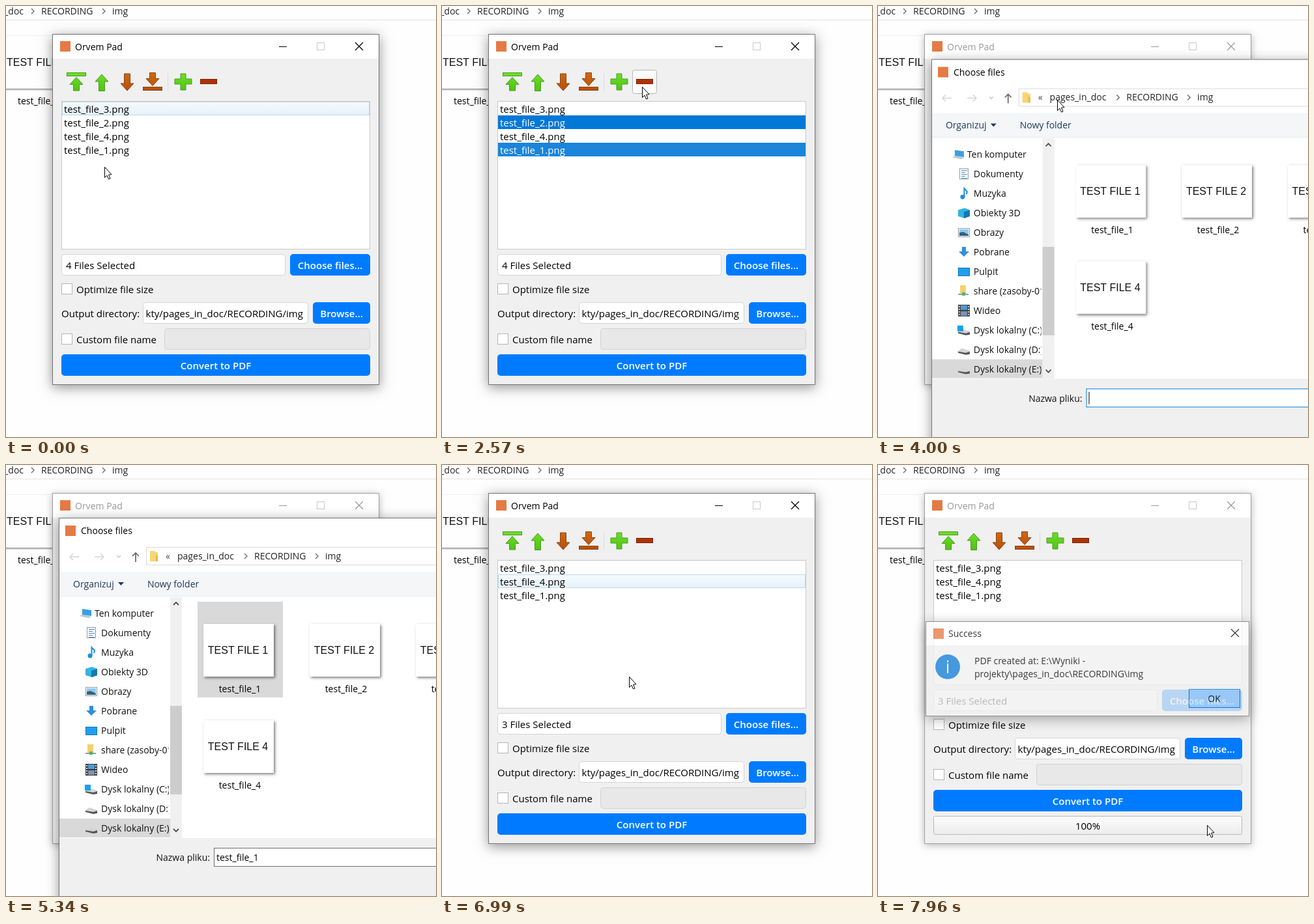
Recreate the animation shown at these times as an HTML page with a canvas. Size 660 px wide and 662 px high, loop 8 s.

```html
<!DOCTYPE html>
<html lang="en">
<head>
<meta charset="utf-8">
<title>Orvem Pad</title>
<style>
html, body { margin: 0; width: 100%; height: 100%; overflow: hidden; background: #fefefe; }
canvas { display: block; }
</style>
</head>
<body>
<canvas id="stage" width="660" height="662"></canvas>
<script>
const W = 660, H = 662, LOOP = 8000, STEP = 60;
const UI = '"Open Sans", "Noto Sans", sans-serif';
const F14 = '14px ' + UI, F15 = '15px ' + UI, BOLD = '600 15px ' + UI;
const ARIAL = '16px "Liberation Sans", Arial, sans-serif';
const BLUE = '#007bff', DARK_BLUE = '#0069d9', ACCENT = '#0078d7', BADGE = '#e57a45';

const screen = document.getElementById('stage').getContext('2d');
const buffer = document.createElement('canvas');
buffer.width = W;
buffer.height = H;
let g = screen;

// Pointer path: start time, number of steps, end point
const START = [151, 247];
const MOVES = [
  [420, 7, 141, 166], [970, 2, 147, 181], [1520, 2, 166, 204], [1770, 2, 172, 220],
  [2270, 6, 307, 124], [3130, 5, 489, 395], [3820, 4, 275, 144], [4060, 7, 360, 284],
  [4660, 4, 700, 560], [5890, 1, 489, 395], [5950, 7, 224, 258], [6810, 13, 505, 553]
];
const CLICKS = [1210, 2020, 2820, 3500, 4540, 7720];

const ease = p => p * p * (3 - 2 * p);
const stepsSince = (t, start) => Math.floor((t - start) / STEP) + 1;
const between = (t, a, b) => t >= a && t < b;

function pointer(t) {
  let [x, y] = START;
  for (const [start, n, tx, ty] of MOVES) {
    if (t < start) break;
    const p = ease(Math.min(1, stepsSince(t, start) / n));
    x += (tx - x) * p;
    y += (ty - y) * p;
  }
  return { x: Math.round(x), y: Math.round(y) };
}

function rect(x, y, w, h, fill, stroke) {
  if (fill) { g.fillStyle = fill; g.fillRect(x, y, w, h); }
  if (stroke) { g.strokeStyle = stroke; g.lineWidth = 1; g.strokeRect(x + .5, y + .5, w - 1, h - 1); }
}

function round(x, y, w, h, r, fill, stroke) {
  g.beginPath();
  g.roundRect(x + (stroke ? .5 : 0), y + (stroke ? .5 : 0), w - (stroke ? 1 : 0), h - (stroke ? 1 : 0), r);
  g.fillStyle = fill;
  g.fill();
  if (stroke) { g.strokeStyle = stroke; g.lineWidth = 1; g.stroke(); }
}

function text(s, x, y, font = F15, color = '#000', align = 'left') {
  g.font = font;
  g.fillStyle = color;
  g.textAlign = align;
  g.fillText(s, x, y);
}

function line(points, color, width = 1) {
  g.beginPath();
  for (let i = 0; i < points.length; i += 2) g.lineTo(points[i], points[i + 1]);
  g.strokeStyle = color;
  g.lineWidth = width;
  g.stroke();
}

function poly(points, fill, stroke, width = 1) {
  g.beginPath();
  for (let i = 0; i < points.length; i += 2) g.lineTo(points[i], points[i + 1]);
  g.closePath();
  if (fill) { g.fillStyle = fill; g.fill(); }
  if (stroke) { g.strokeStyle = stroke; g.lineWidth = width; g.stroke(); }
}

function disc(x, y, r, fill) {
  g.beginPath();
  g.arc(x, y, r, 0, 7);
  g.fillStyle = fill;
  g.fill();
}

function clipped(x, y, w, h, draw) {
  g.save();
  g.beginPath();
  g.rect(x, y, w, h);
  g.clip();
  draw();
  g.restore();
}

function vertical(y0, y1, a, b) {
  const fill = g.createLinearGradient(0, y0, 0, y1);
  fill.addColorStop(0, a);
  fill.addColorStop(1, b);
  return fill;
}

// Draws a window on its own layer so that it fades as one piece
function layer(alpha, scale, cx, cy, draw) {
  g = buffer.getContext('2d');
  g.setTransform(1, 0, 0, 1, 0, 0);
  g.clearRect(0, 0, W, H);
  g.setTransform(scale, 0, 0, scale, cx * (1 - scale), cy * (1 - scale));
  draw();
  g = screen;
  g.globalAlpha = alpha;
  g.drawImage(buffer, 0, 0);
  g.globalAlpha = 1;
}

function frame(x, y, w, h, fill, active) {
  g.save();
  g.shadowColor = active ? 'rgba(0,0,0,.42)' : 'rgba(0,0,0,.28)';
  g.shadowBlur = active ? 18 : 11;
  g.shadowOffsetY = active ? 4 : 2;
  rect(x, y, w, h, fill);
  g.restore();
  rect(x, y, w, h, null, active ? '#737373' : '#a0a0a0');
}

function cross(x, y, color) {
  line([x - 6, y - 6, x + 6, y + 6], color, 1.2);
  line([x + 6, y - 6, x - 6, y + 6], color, 1.2);
}

const chevron = (x, y, color = '#666') => line([x - 2, y - 4, x + 2, y, x - 2, y + 4], color, 1.3);

function thumb(x, y, n) {
  g.save();
  g.shadowColor = 'rgba(0,0,0,.5)';
  g.shadowBlur = 4;
  g.shadowOffsetX = g.shadowOffsetY = 2;
  rect(x, y, 108, 81, '#fff');
  g.restore();
  text('TEST FILE ' + n, x + 53, y + 46, ARIAL, '#111', 'center');
  text('test_file_' + n, x + 56, y + 105, F14, '#000', 'center');
}

function desktop() {
  rect(0, 0, W, H, '#fefefe');
  text('_doc', 27, 13, F14, '#222', 'right');
  chevron(41, 8);
  text('RECORDING', 54, 13, F14, '#222');
  chevron(150, 8);
  text('img', 163, 13, F14, '#222');
  rect(0, 21, W, 1, '#e3e3e3');
  rect(0, 45, 72, 1, '#f0f0f0');
  rect(0, 127, 76, 1, '#8c8c8c');
  rect(0, 128, 76, 2, '#d4d4d4');
  text('TEST FILE 1', 1, 92, ARIAL, '#111');
  text('test_file_1', 18, 151, F14);
}

function arrow(x, top, bottom, up, fill, edge) {
  const tip = up ? top : bottom, tail = up ? bottom : top, neck = tip + (up ? 11 : -11);
  poly([x, tip, x + 10, neck, x + 4.5, neck, x + 4.5, tail, x - 4.5, tail, x - 4.5, neck, x - 10, neck], fill, edge);
}

function toolbar(hover) {
  const green = vertical(102, 130, '#6fe02a', '#4fc414'), greenEdge = '#4a9a1e';
  const brown = vertical(102, 130, '#cf6a12', '#b84e0c'), brownEdge = '#8a4310';
  rect(93, 102, 30, 6, green, greenEdge);
  arrow(108, 109.5, 130, true, green, greenEdge);
  arrow(147, 105, 130.5, true, green, greenEdge);
  arrow(186, 104, 130, false, brown, brownEdge);
  arrow(225, 102.5, 122.5, false, brown, brownEdge);
  rect(210, 124, 30, 6, brown, brownEdge);
  rect(248, 103, 1, 28, '#dcdcdc');
  poly([268, 104, 276, 104, 276, 112, 285, 112, 285, 120, 276, 120, 276, 129, 268, 129, 268, 120, 259, 120, 259, 112, 268, 112],
    green, greenEdge);
  if (hover) round(292, 98, 38, 37, 3, '#fdfdfd', '#b4b4b4');
  rect(298, 112, 26, 8, '#ae3208', '#7c2405');
}

function fileList(t, height) {
  rect(85, 146, 474, height, '#fff', '#c9c9c9');
  const names = t < 2880 ? [3, 2, 4, 1] : t < 5580 ? [3, 4] : [3, 4, 1];
  const focus = t < 1210 ? 0 : between(t, 2880, 7720) ? 1 : -1;
  names.forEach((n, i) => {
    const y = 147 + 21 * i;
    const second = i === 1 && between(t, 1210, 2880);
    const fourth = i === 3 && between(t, 2020, 2880);
    if (second) rect(86, y + 21 - 21, 472, 21, ACCENT);
    if (fourth) rect(86, y, 472, 21, '#1a85db');
    if (i === focus) rect(86, y, 472, 21, vertical(y, y + 21, '#f5fafe', '#e6f1fa'), '#bfd9ea');
    text('test_file_' + n + '.png', 89, y + 17, F15, second || fourth ? '#fff' : '#000');
  });
}

function button(x, y, w, label, dark) {
  round(x, y, w, 33, 5, dark ? DARK_BLUE : BLUE);
  text(label, x + w / 2, y + 23, BOLD, '#fff', 'center');
}

function checkbox(y, label) {
  rect(85, y, 17, 17, '#fff', '#b5b5b5');
  text(label, 108, y + 15);
}

function appWindow(t, hover) {
  const active = !between(t, 3620, 5520) && t < 7840;
  const ink = active ? '#000' : '#999';
  const shift = t >= 7840 ? -36 : 0;
  frame(71, 43, 502, 539, '#f0f0f0', active);
  rect(72, 44, 500, 37, '#fff');
  rect(83, 54, 16, 16, BADGE);
  text('Orvem Pad', 106, 68, F14, ink);
  rect(419, 62, 12, 1, ink);
  rect(477, 56, 12, 12, null, '#c8c8c8');
  cross(542, 62, ink);
  toolbar(hover === 'remove');
  fileList(t, 228 + shift);

  g.save();
  g.translate(0, shift);
  const count = t < 2880 ? 4 : t < 5580 ? 2 : 3;
  round(85, 381, 344, 33, 4, '#fff', '#d4d4d4');
  text(count + ' Files Selected', 92, 404);
  button(436, 381, 123, 'Choose files...', hover === 'choose' && t < 3820);
  checkbox(426, 'Optimize file size');
  text('Output directory:', 85, 478);
  round(210, 455, 254, 33, 4, '#fff', '#d4d4d4');
  clipped(215, 456, 245, 31, () => text('projekty/pages_in_doc/RECORDING/img', 456, 478, F15, '#000', 'right'));
  button(471, 455, 88, 'Browse...');
  checkbox(503, 'Custom file name');
  round(243, 495, 316, 33, 4, '#e8e8e8', '#d2d2d2');
  button(85, 535, 474, 'Convert to PDF', hover === 'convert');
  g.restore();

  if (shift) {
    round(85, 539, 474, 29, 2, vertical(539, 568, '#fdfdfd', '#ececec'), '#b8b8b8');
    text('100%', 322, 560, F15, '#000', 'center');
  }
}

function drive(y) {
  poly([122, y, 128, y - 4, 140, y, 140, y + 4, 134, y + 5, 122, y + 2], '#d5d5d5');
  poly([122, y + 1, 134, y + 3, 140, y + 1, 140, y + 5, 134, y + 6, 122, y + 3], '#555');
}

const PLACES = [
  ['Ten komputer', y => {
    poly([117, y - 7, 131, y - 5, 131, y + 4, 117, y + 2], '#3a9fe0');
    poly([113, y + 4, 117, y + 2, 131, y + 5, 127, y + 7], '#b8c4cc');
  }],
  ['Dokumenty', y => {
    rect(124, y - 9, 14, 17, '#fff', '#8a98a4');
    for (let i = 0; i < 5; i++) rect(127, y - 6 + i * 3, i % 2 ? 6 : 9, 1, '#3f86bd');
  }],
  ['Muzyka', y => {
    disc(129, y + 5, 3.5, '#1c8fe0');
    line([131.5, y + 5, 131.5, y - 8, 136, y - 3, 135, y + 1], '#1c8fe0', 2);
  }],
  ['Obiekty 3D', y => {
    poly([122, y - 5, 132, y - 8, 140, y - 5, 140, y + 5, 132, y + 8, 122, y + 5], '#35b4e4');
    poly([131, y - 2, 140, y - 5, 140, y + 5, 131, y + 8], '#1578ae');
  }],
  ['Obrazy', y => {
    rect(122, y - 7, 18, 14, '#fff', '#8d9aa3');
    rect(124, y - 5, 14, 10, '#8ccaf2');
    poly([124, y + 5, 124, y, 130, y - 1, 138, y + 3, 138, y + 5], '#35617e');
  }],
  ['Pobrane', y => poly([128, y - 8, 134, y - 8, 134, y - 1, 139, y - 1, 131, y + 7, 123, y - 1, 128, y - 1], '#2f8fdd')],
  ['Pulpit', y => rect(122, y - 6, 18, 13, '#1ea0ee', '#1673b4')],
  ['share (zasoby-01)', y => {
    poly([125, y - 9, 134, y - 9, 134, y + 4, 125, y + 4], '#f5d06c');
    rect(122, y + 4, 16, 2, '#8aa0ad');
    rect(128, y + 2, 5, 5, '#57b26a');
  }],
  ['Wideo', y => {
    rect(122, y - 9, 18, 18, '#3a3a3a');
    rect(126, y - 8, 10, 7, '#4d9bd4');
    rect(126, y + 1, 10, 7, '#7a94b0');
    for (let i = 0; i < 4; i++) { rect(123, y - 7 + i * 4, 2, 2, '#ddd'); rect(137, y - 7 + i * 4, 2, 2, '#ddd'); }
  }],
  ['Dysk lokalny (C:)', y => { drive(y + 2); rect(121, y - 7, 9, 9, '#1ba1e8'); }],
  ['Dysk lokalny (D:)', y => drive(y + 2)],
  ['Dysk lokalny (E:)', y => drive(y + 2)]
];

function fileDialog(t) {
  frame(81, 81, 900, 640, '#fff', true);
  rect(91, 93, 16, 16, BADGE);
  text('Choose files', 115, 106, F14);

  line([112, 141, 98, 141], '#d2d2d2', 1.4);
  line([103, 136, 98, 141, 103, 146], '#d2d2d2', 1.4);
  line([136, 141, 150, 141], '#d2d2d2', 1.4);
  line([145, 136, 150, 141, 145, 146], '#d2d2d2', 1.4);
  line([170, 139, 173, 142, 176, 139], '#c4c4c4', 1.3);
  line([199, 149, 199, 135], '#666', 1.7);
  line([194, 140, 199, 135, 204, 140], '#666', 1.7);
  rect(215, 126, 600, 28, '#fff', '#d9d9d9');
  poly([221, 132, 229, 132, 229, 134, 233, 134, 233, 148, 221, 148], '#f8d573');
  rect(230, 139, 3, 9, '#e8b84a');
  text('«', 245, 145, F14, '#444');
  text('pages_in_doc', 263, 145, F14, '#222');
  chevron(368, 140);
  text('RECORDING', 381, 145, F14, '#222');
  chevron(477, 140);
  text('img', 490, 145, F14, '#222');

  rect(82, 164, 800, 38, '#f4f6f8');
  rect(82, 201, 800, 1, '#e9ecef');
  text('Organizuj', 103, 188, F14, '#1e395b');
  poly([172, 180, 181, 180, 176.5, 185], '#1e395b');
  text('Nowy folder', 217, 188, F14, '#1e395b');

  rect(82, 543, 170, 29, '#d9d9d9');
  clipped(82, 203, 168, 369, () => PLACES.forEach(([label, icon], i) => {
    const y = 228 + 30 * i;
    icon(y);
    text(label, i ? 146 : 136, y + 5, F14, '#111');
  }));
  rect(252, 203, 18, 370, '#f0f0f0');
  rect(252, 370, 18, 136, '#cdcdcd');
  line([257, 215, 261, 211, 265, 215], '#505050', 1.8);
  line([257, 559, 261, 563, 265, 559], '#505050', 1.8);

  if (t >= 5340) rect(294, 210, 131, 147, '#d9d9d9');
  else if (t >= 4540) rect(294, 210, 131, 147, '#cce8ff', '#99d1ff');
  for (let i = 0; i < 4; i++) thumb(303 + 163 * (i % 3), 244 + 148 * Math.floor(i / 3), i + 1);

  rect(82, 573, 800, 140, '#f0f0f0');
  text('Nazwa pliku:', 313, 608, F14, '#111', 'right');
  rect(319, 588, 500, 29, '#fff', t < 4540 ? ACCENT : '#707070');
  if (t >= 4660) text('test_file_1', 323, 608, F14);
  else if (t < 4540) rect(323, 593, 1, 19, '#000');
}

function successDialog() {
  frame(73, 240, 497, 146, '#f0f0f0', true);
  rect(74, 241, 495, 36, '#fff');
  rect(85, 251, 16, 16, BADGE);
  text('Success', 108, 264, F14);
  cross(548, 258, '#000');
  disc(107, 310, 19, '#0f7bd3');
  rect(106, 305, 2, 15, '#fff');
  rect(106, 300, 2, 3, '#fff');
  text('PDF created at: E:\\Wyniki -', 148, 306, F14);
  text('projekty\\pages_in_doc\\RECORDING\\img', 148, 326, F14);
  rect(477, 344, 79, 29, '#c8e0f6', ACCENT);
  text('OK', 516, 364, F14, '#000', 'center');
}

function hoverTarget(t, p) {
  if (between(t, 3820, 5580) || t >= 7840) return '';
  const inside = (x, y, w, h) => p.x >= x && p.x < x + w && p.y >= y && p.y < y + h;
  if (inside(292, 98, 38, 37)) return 'remove';
  if (inside(436, 381, 123, 33)) return 'choose';
  if (inside(85, 535, 474, 33)) return 'convert';
  return '';
}

const HAND = new Path2D('M-2 2Q0-1 2 2V9Q4 7 6 9Q8 8 9 10Q11 10 11 13V16Q10 19 9 23.5H-1Q-2 20-5 15Q-6.5 11-4 11.5L-2 14Z');

function cursor(p, hand, pressed) {
  if (pressed) disc(p.x, p.y, 15, 'rgba(255,238,0,.46)');
  g.save();
  g.translate(p.x, p.y);
  if (hand) {
    g.translate(2, .5);
    g.fillStyle = pressed ? '#fffbe0' : '#fff';
    g.strokeStyle = '#000';
    g.lineWidth = 1.1;
    g.fill(HAND);
    g.stroke(HAND);
    line([2, 9, 2, 13], '#000');
    line([6, 10, 6, 13], '#000');
    line([9, 11, 9, 14], '#000');
  } else {
    poly([.5, .5, .5, 16.5, 4, 13.2, 6.5, 19, 9, 18, 6.6, 12.2, 11, 11.7], '#fff', '#000');
  }
  g.restore();
}

function render(t) {
  const p = pointer(t), hover = hoverTarget(t, p);
  desktop();
  appWindow(t, hover);
  if (between(t, 3820, 5520)) {
    const k = stepsSince(t, 3820);
    const alpha = t < 5400 ? Math.min(1, k / 4) : t < 5460 ? .6 : .25;
    const scale = t >= 5400 ? 1 - .02 * stepsSince(t, 5400) : k < 5 ? 1 - .05 / k ** 2.3 : 1;
    layer(alpha, scale, 550, 380, () => fileDialog(t));
  }
  if (t >= 7900) layer(t < 7960 ? .4 : .77, t < 7960 ? .97 : 1, 322, 313, successDialog);
  cursor(p, hover === 'choose' || hover === 'convert', CLICKS.some(c => between(t, c, c + 2 * STEP)));
}

function tick() {
  render(performance.now() % LOOP);
  requestAnimationFrame(tick);
}
tick();
</script>
</body>
</html>
```
